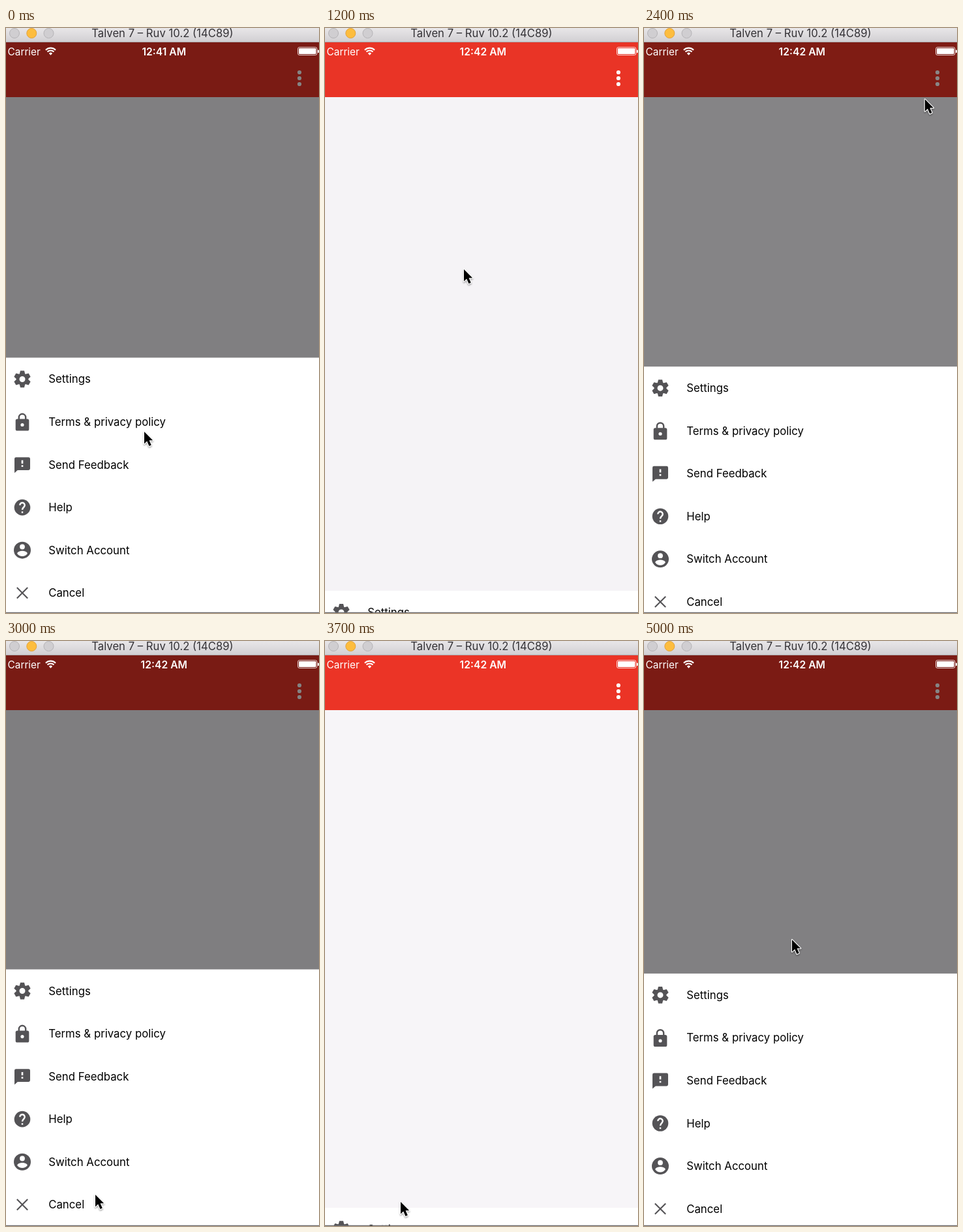
Animation, 480 px wide and 897 px high, one loop 5.1 s. Source, as an HTML page:

```html
<!DOCTYPE html>
<html lang="en">
<head>
<meta charset="utf-8">
<title>Bottom sheet menu</title>
<style>
  html, body { margin: 0; width: 100%; height: 100%; overflow: hidden; background: #f7f5f8; }
  svg { display: block; width: 100%; height: 100%; }
  text { font-family: Inter, Roboto, sans-serif; }
  .title { font-size: 16.7px; fill: #343236; text-anchor: middle; }
  .carrier { font-size: 15.4px; fill: #fff; }
  .clock { font-size: 15.7px; font-weight: 600; fill: #fff; text-anchor: middle; }
  .label { font-size: 16.8px; fill: #000; }
  .icon { fill: #545356; stroke: none; }
  .line { fill: none; stroke: #545356; }
  .hole { fill: #fff; }
</style>
</head>
<body>
<svg viewBox="0 0 480 897" preserveAspectRatio="none">
  <defs>
    <linearGradient id="chrome" x2="0" y2="1">
      <stop stop-color="#e8e6e8"/><stop offset="1" stop-color="#d1cfd2"/>
    </linearGradient>
    <filter id="shadow" x="-50%" y="-50%" width="200%" height="200%">
      <feDropShadow dx="0" dy="1.5" stdDeviation="1.2" flood-opacity=".4"/>
    </filter>
    <path id="tooth" d="M-3.3 -6L-2.3 -9.9H2.3L3.3 -6Z"/>
  </defs>

  <rect width="480" height="897" fill="#f7f5f8"/>
  <rect y="22" width="480" height="84" fill="#eb3426"/>
  <g id="dots" fill="#fff"></g>
  <rect id="dim" y="22" width="480" height="875"/>

  <!-- Status bar -->
  <text class="carrier" x="2.5" y="41.5">Carrier</text>
  <g fill="none" stroke="#fff" stroke-width="2.1">
    <path d="M63.5 36.6a7 7 0 0 1 10 0M60.9 33.7a11 11 0 0 1 15.2 0"/>
    <path d="M68.5 41.7l-2.6-2.8a3.7 3.7 0 0 1 5.2 0z" fill="#fff" stroke="none"/>
  </g>
  <text class="clock" id="clock" x="242.3" y="41.5"></text>
  <rect x="447.5" y="29.5" width="29.5" height="12" rx="2.6" fill="none" stroke="#fff" stroke-opacity=".8"/>
  <rect x="449" y="31" width="26.5" height="9" rx="1.3" fill="#fff"/>
  <path d="M478 33.5a2 2 0 0 1 0 4.6z" fill="#fff"/>

  <!-- Menu sheet -->
  <g id="sheet">
    <rect width="480" height="420" fill="#fff"/>
    <g id="rows"></g>
  </g>
  <rect y="895.8" width="480" height="1.2" fill="#6c6b6d"/>

  <!-- Window bar -->
  <rect width="480" height="22" fill="url(#chrome)"/>
  <rect y="21" width="480" height="1" fill="#aca8ab"/>
  <g fill="#d0ced1" stroke="#b6b4b7">
    <circle cx="13" cy="8" r="7.5"/>
    <circle cx="39.3" cy="8" r="7.5" fill="#fdbd3e" stroke="#e2a23a"/>
    <circle cx="65.5" cy="8" r="7.5"/>
  </g>
  <text class="title" x="240" y="14.4">Talven 7 – Ruv 10.2 (14C89)</text>

  <g id="cursor" filter="url(#shadow)">
    <path d="M0 0V18.4L4.2 14.5L7.5 22L10.8 20.6L7.6 13.2H13.2Z" stroke="#fff" stroke-width="2.2"
      stroke-linejoin="round" paint-order="stroke"/>
  </g>
</svg>
<script>
const LOOP = 5100, STEP = 100;
const CLOSED = 897, OPEN = 503.5, MAX_DIM = 0.485, SETTLE = 85;
const byId = id => document.getElementById(id);
const repeat = (n, make) => Array.from({ length: n }, (_, i) => make(i)).join('');

byId('dots').innerHTML = repeat(3, i => `<circle cx="450" cy="${68 + 9 * i}" r="3.1"/>`);
const teeth = repeat(6, i => `<use href="#tooth" transform="rotate(${60 * i})"/>`);

// Icons are drawn around their own centre.
const items = [
  ['Settings', 1.3, `<circle class="line" r="5.3" stroke-width="3.7"/><g class="icon">${teeth}</g>`],
  ['Terms & privacy policy', 1.29, `<rect class="icon" x="-8" y="-3.5" width="16" height="14" rx="2"/>
    <path class="line" d="M-4 -3V-5.5a4 4 0 0 1 8 0V-3" stroke-width="1.9"/><circle class="hole" cy="3.5" r="2"/>`],
  ['Send Feedback', 1.2, `<path class="icon" d="M-8 -9.5H8a2 2 0 0 1 2 2V5a2 2 0 0 1-2 2H-6L-10 10.5V-7.5a2 2 0 0 1 2-2z"/>
    <path class="hole" d="M-1.1 -5.6H1.1V-1.4H-1.1zM-1.1 .6H1.1V2.8H-1.1z"/>`],
  ['Help', 1.23, `<circle class="icon" r="10"/><path d="M-3 -2.8a3 3 0 1 1 5.1 2.1C.8 .5 0 1.3 0 3"
    fill="none" stroke="#fff" stroke-width="2"/><path class="hole" d="M-1 5H1V7H-1z"/>`],
  ['Switch Account', 1.3, `<circle class="icon" r="10"/><circle class="hole" cy="-4" r="3"/>
    <path class="hole" d="M-6 4C-6 2-2 .9 0 .9S6 2 6 4A7.2 7.2 0 0 1-6 4z"/>`],
  ['Cancel', 1.3, '<path class="line" d="M-6.3 -6.3L6.3 6.3M6.3 -6.3L-6.3 6.3" stroke-width="1.6"/>']
];
byId('rows').innerHTML = items.map(([label, scale, icon], i) => {
  const y = 33 + i * 65.55;
  return `<g transform="translate(25 ${y}) scale(${scale})">${icon}</g>
    <text class="label" x="65.2" y="${y + 6}">${label.replace('&', '&amp;')}</text>`;
}).join('');

// The sheet opens and closes in turn; the last opening carries over the loop.
const toggles = [
  { at: 4650 - LOOP, open: true },
  { at: 992, open: false },
  { at: 2126, open: true },
  { at: 3475, open: false },
  { at: 4650, open: true }
];

// Each leg takes the pointer to (x, y), starting and ending at rest.
const home = { x: 212, y: 619 };
const legs = [
  { from: 300, to: 800, x: 213, y: 370 },
  { from: 1200, to: 1500, x: 448, y: 66 },
  { from: 2300, to: 3000, x: 137, y: 849 },
  { from: 3000, to: 3300, x: 116, y: 860 },
  { from: 3700, to: 3900, x: 450, y: 76 },
  { from: 4700, to: 5000, x: 227, y: 458 },
  { from: 5000, to: LOOP, ...home }
];

const mix = (a, b, k) => a + (b - a) * k;
const ease = k => k * k * (3 - 2 * k);
const clamp = k => Math.min(1, Math.max(0, k));

function pointerAt(t) {
  return legs.reduce((p, leg) => {
    const k = ease(clamp((t - leg.from) / (leg.to - leg.from)));
    return { x: mix(p.x, leg.x, k), y: mix(p.y, leg.y, k) };
  }, home);
}

function draw(now) {
  // The picture advances ten times a second.
  const t = Math.floor((now % LOOP) / STEP) * STEP;
  const { at, open } = toggles.findLast(toggle => toggle.at <= t);
  const rest = Math.exp((at - t) / SETTLE);
  const shown = open ? 1 - rest : rest;
  const press = open ? Math.exp(-(((t - at) / 150) ** 2)) : 0;
  const { x, y } = pointerAt(t);

  byId('sheet').setAttribute('transform', `translate(0 ${mix(CLOSED, OPEN, shown)})`);
  byId('dim').setAttribute('opacity', MAX_DIM * clamp((shown - 0.07) / 0.93));
  byId('dots').setAttribute('opacity', 1 - 0.8 * press);
  byId('cursor').setAttribute('transform', `translate(${x} ${y})`);
  byId('clock').textContent = t < 1100 ? '12:41 AM' : '12:42 AM';
}

const start = performance.now();
function tick() {
  draw(performance.now() - start);
  requestAnimationFrame(tick);
}
tick();
</script>
</body>
</html>
```
